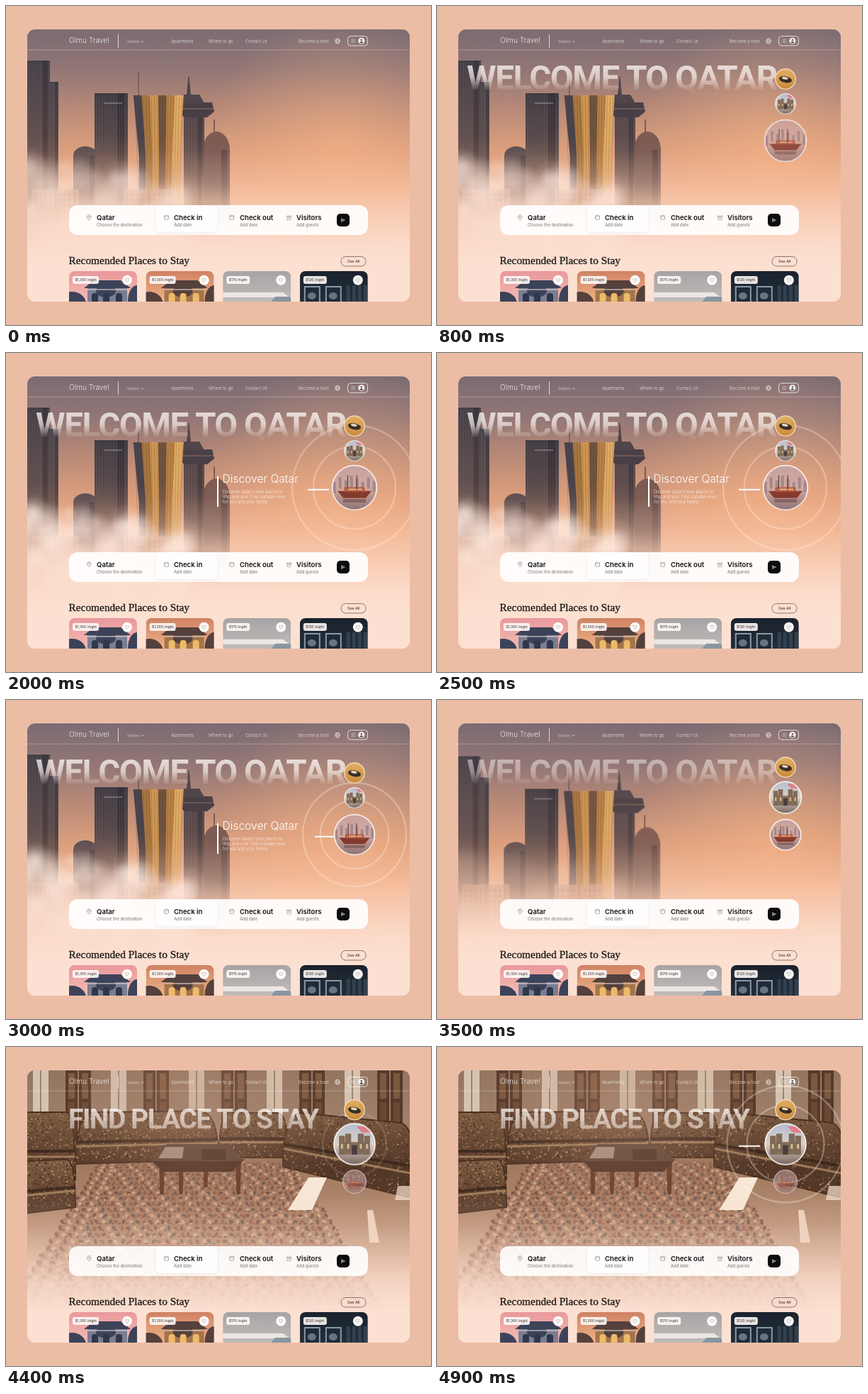
Recreate the animation shown at these times as an HTML page with a canvas. Size 600 by 450 pixels, loop 5 s.

```html
<!DOCTYPE html>
<html lang="en">
<head>
<meta charset="utf-8">
<title>Travel landing page</title>
<style>
html, body { margin: 0; width: 100%; height: 100%; overflow: hidden; background: #ecbda5; }
canvas { display: block; width: 600px; height: 450px; }
</style>
</head>
<body>
<canvas id="stage" width="600" height="450"></canvas>
<script>
const W = 600, H = 450, LOOP = 5000, STEP = 100, TAU = Math.PI * 2;
const SANS = 'Inter, sans-serif';
const stage = document.getElementById('stage').getContext('2d');

const ramp = (t, a, b) => Math.min(1, Math.max(0, (t - a) / (b - a)));
const ease = (t, a, b) => { const u = ramp(t, a, b); return u * u * (3 - 2 * u); };
const mix = (a, b, u) => a + (b - a) * u;

let seed = 7;
const rnd = () => (seed = (seed * 16807) % 2147483647) / 2147483647;
const pick = list => list[Math.floor(rnd() * list.length)];

function layer(paint) {
  const c = document.createElement('canvas');
  c.width = W; c.height = H;
  paint(c.getContext('2d'));
  return c;
}
// Vertical gradient with evenly spaced colours
function fade(g, y0, y1, ...colors) {
  const f = g.createLinearGradient(0, y0, 0, y1);
  colors.forEach((c, i) => f.addColorStop(i / (colors.length - 1), c));
  return f;
}
function rect(g, fill, x, y, w, h) { g.fillStyle = fill; g.fillRect(x, y, w, h); }
function box(g, x, y, w, h, r) { g.beginPath(); g.roundRect(x, y, w, h, r); }
function dot(g, fill, x, y, rx, ry = rx, a = 0) {
  g.fillStyle = fill; g.beginPath(); g.ellipse(x, y, rx, ry, a, 0, TAU); g.fill();
}
function ring(g, color, width, x, y, r) {
  g.strokeStyle = color; g.lineWidth = width;
  g.beginPath(); g.arc(x, y, r, 0, TAU); g.stroke();
}
function line(g, color, width, x0, y0, x1, y1) {
  g.strokeStyle = color; g.lineWidth = width;
  g.beginPath(); g.moveTo(x0, y0); g.lineTo(x1, y1); g.stroke();
}
// Trapezoid around a centre; lean moves its lower edge sideways
function trap(g, fill, cx, y0, w0, y1, w1, lean = 0) {
  g.fillStyle = fill; g.beginPath();
  g.moveTo(cx - w0 / 2, y0); g.lineTo(cx + w0 / 2, y0);
  g.lineTo(cx + lean + w1 / 2, y1); g.lineTo(cx + lean - w1 / 2, y1);
  g.fill();
}
function text(g, str, x, y, size, fill, weight = 400, family = SANS) {
  g.font = `${weight} ${size}px ${family}`; g.fillStyle = fill; g.fillText(str, x, y);
}

// ---- Skyline ----
const sky = layer(g => {
  rect(g, fade(g, 33, 375, '#7b6b73', '#927675', '#b98a77', '#dda07e', '#efb38f', '#f5c6aa', '#fce1d2'), 0, 0, W, H);
  const glow = g.createRadialGradient(470, 200, 10, 470, 200, 190);
  glow.addColorStop(0, 'rgba(255,186,138,.45)');
  glow.addColorStop(1, 'rgba(255,186,138,0)');
  rect(g, glow, 0, 0, W, H);
});

function tower(g, x, w, top, color, dome = 0) {
  const fill = fade(g, top, 330, color, '#64514f', '#ad8674');
  if (dome) dot(g, fill, x + w / 2, top + dome, w / 2, dome);
  rect(g, fill, x, top + dome, w, 330 - top);
  for (let i = 3; i < w; i += 4)
    line(g, 'rgba(165,135,128,.28)', .7, x + i, top + dome + 3, x + i, 320);
  rect(g, 'rgba(28,25,33,.3)', x + w * .68, top + dome, w * .22, 200);
}

const towers = layer(g => {
  tower(g, 278, 38, 177, '#805b52', 26);
  line(g, '#805b52', 2, 294, 160, 294, 182);
  tower(g, 30, 32, 77, '#443f48');
  tower(g, 60, 14, 107, '#4a444b');
  tower(g, 95, 34, 198, '#554a51', 13);
  tower(g, 125, 47, 123, '#3f3b43');
  rect(g, 'rgba(170,150,148,.5)', 138, 136, 26, 2);
  tower(g, 251, 29, 140, '#53454a');
  trap(g, '#493f46', 268, 136, 46, 149, 52);
  trap(g, '#493f46', 268, 149, 52, 157, 32);
  trap(g, '#50454b', 262, 125, 22, 137, 36);
  trap(g, '#50454b', 258, 99, 1, 126, 6);
  line(g, '#a87c68', .8, 244, 145, 293, 145);

  // Faceted gold tower, pinched in the middle
  for (let i = 0; i < 6; i++) {
    const tone = ['#4b444c', '#a87640', '#d09650', '#71543f', '#b98145', '#e0ab63'][i];
    const waist = 193 + i * 9.4;
    trap(g, tone, 186 + i * 11.7, 126, 12.5, 212, 10.5, waist - 186 - i * 11.7);
    trap(g, tone, waist, 211.5, 10.5, 330, 12);
    for (let k = 0; k < 3; k++)
      line(g, 'rgba(55,40,36,.3)', .7, 182 + i * 11.7 + k * 4, 128, waist - 4 + k * 4, 320);
  }
  line(g, '#54474c', 1, 187, 127, 187, 93);

  for (const x of [36, 70, 166, 204]) {
    rect(g, 'rgba(186,145,126,.75)', x, 258, 33, 80);
    for (let i = 0; i < 32; i++)
      rect(g, 'rgba(100,72,68,.4)', x + 4 + i % 4 * 7, 264 + (i >> 2) * 8, 3, 4);
  }
  g.globalCompositeOperation = 'destination-out';
  rect(g, fade(g, 185, 335, 'rgba(0,0,0,0)', 'rgba(0,0,0,.35)', '#000'), 0, 0, W, H);
});

const clouds = layer(g => {
  for (let i = 0; i < 150; i++) {
    const x = 10 + rnd() * 250, r = 12 + rnd() * 22;
    const y = 222 + Math.max(0, x - 70) * .2 + rnd() * 100;
    const f = g.createRadialGradient(x, y, 0, x, y, r);
    f.addColorStop(0, 'rgba(255,244,238,.3)');
    f.addColorStop(.5, 'rgba(255,239,231,.17)');
    f.addColorStop(1, 'rgba(255,236,226,0)');
    dot(g, f, x, y, r);
  }
});

// ---- Living room ----
const FLORAL = ['#3b281c', '#a68059', '#4b3224', '#c29b70', '#8b5c3e'];
const RUG = ['#7d5343', '#c8a184', '#6b5a55', '#955f4a'];

function sofa(g, x, y, w, h, slant = 0) {
  g.save();
  g.beginPath();
  g.moveTo(x, y + h);
  g.quadraticCurveTo(x, y, x + w * .14, y);
  g.lineTo(x + w * .86, y + slant * .3);
  g.quadraticCurveTo(x + w, y + slant * .3, x + w, y + h + slant);
  g.closePath();
  g.fillStyle = fade(g, y, y + h, '#7b5b42', '#664733', '#543828');
  g.fill();
  g.strokeStyle = '#4a2e1e'; g.lineWidth = 2; g.stroke();
  g.clip();
  g.globalAlpha = .75;
  for (let i = 0; i < w * h / 16; i++)
    dot(g, pick(FLORAL), x + rnd() * w, y + rnd() * (h + slant), .7 + rnd(), .6 + rnd() * .6, rnd() * 3);
  line(g, '#35231a', 4, x, y + h * .58, x + w, y + h * .58 + slant * .7);
  line(g, '#b58f68', 3, x, y + h * .66, x + w, y + h * .66 + slant * .8);
  g.restore();
}

const room = layer(g => {
  rect(g, fade(g, 33, 165, '#93745f', '#a78a75'), 0, 0, W, H);
  for (let x = -26; x < W; x += 110) {
    for (const side of [0, 19]) {
      rect(g, '#56392a', x + side, 33, 17, 100);
      rect(g, '#7c583f', x + side + 4, 37, 9, 36);
      rect(g, '#6a4833', x + side + 4, 78, 9, 50);
    }
    rect(g, '#d5c3b0', x + 64, 33, 22, 78);
    line(g, '#896c58', 1.5, x + 75, 33, x + 75, 110);
  }

  rect(g, fade(g, 150, 400, '#9b7358', '#bd957b', '#e0b89f'), 0, 150, W, 300);
  // Woven rug: rosettes on a grid in perspective, with a border
  for (let row = 0; row < 26; row++) {
    const v = (row / 25) ** 1.4, y = mix(164, 370, v), half = mix(138, 265, v), gap = mix(7, 13, v);
    rect(g, 'rgba(158,116,91,.6)', 268 - half, y - gap / 2, half * 2, gap);
    for (let x = -half, col = 0; x < half; x += gap, col++) {
      const edge = Math.abs(x) > half * .84;
      dot(g, edge ? RUG[col % 2] : RUG[(col + row * 3) % 4], 268 + x + rnd() * 4, y, gap * .36, gap * .24, rnd() * 3);
      dot(g, pick(RUG), 271 + x + rnd() * 5, y + gap * .3, gap * .2, gap * .14);
    }
  }

  sofa(g, 98, 92, 202, 73, -6);
  sofa(g, 301, 93, 97, 63);
  sofa(g, 391, 93, 190, 76, 46);
  sofa(g, 0, 92, 98, 95);
  sofa(g, 0, 162, 98, 76, -12);

  for (const x of [220, 247, 282, 328]) trap(g, '#613822', x, 160, 8, x % 3 ? 208 : 198, 5);
  trap(g, '#4d2f20', 270, 158, 134, 176, 98);
  trap(g, '#5c4437', 270, 137, 86, 161, 132);
  trap(g, 'rgba(218,198,182,.6)', 238, 141, 26, 157, 34, -6);
  box(g, 276, 144, 34, 15, 2); g.fillStyle = '#4a3024'; g.fill();

  trap(g, '#f8e7d6', 440, 184, 26, 230, 34, -25);
  trap(g, 'rgba(250,228,208,.8)', 514, 230, 8, 276, 14, 6);
  trap(g, 'rgba(250,228,208,.7)', 562, 196, 18, 216, 26);
  const haze = g.createRadialGradient(265, 85, 20, 265, 85, 200);
  haze.addColorStop(0, 'rgba(190,145,120,.35)');
  haze.addColorStop(1, 'rgba(190,145,120,0)');
  rect(g, haze, 0, 0, W, H);
});

const mist = layer(g => rect(g, fade(g, 205, 375, 'rgba(250,210,190,0)', 'rgba(250,212,193,.18)',
  'rgba(250,215,197,.5)', 'rgba(251,220,204,.85)', '#fce1d2'), 0, 0, W, H));

// ---- Thumbnails, drawn on a unit circle ----
const scenes = [
  g => {
    rect(g, fade(g, -1, 1, '#e2b063', '#c98a3b'), -1, -1, 2, 2);
    dot(g, '#382e28', 0, .05, .62, .3, .2);
    dot(g, '#e5d5bd', -.05, -.08, .3, .12, .2);
  },
  g => {
    rect(g, fade(g, -1, 1, '#b3bfce', '#dccfc7', '#75655c'), -1, -1, 2, 2);
    trap(g, '#df7f8b', .35, -.85, .5, -.55, .5, .25);
    rect(g, '#86705d', -.7, -.1, 1.4, .6);
    for (const x of [-.6, -.3, .3, .6]) {
      rect(g, '#806a58', x - .14, -.4 - .1 * (Math.abs(x) < .5), .28, .9);
      rect(g, '#d8bd8f', x - .05, 0, .1, .22);
    }
    rect(g, '#4a3f3c', -.13, .05, .26, .45);
  },
  g => {
    rect(g, fade(g, -1, 1, '#c6a1a0', '#d4aaa0', '#8b7274'), -1, -1, 2, 2);
    for (let i = 0; i < 8; i++) rect(g, '#a3888d', -.95 + i * .25, -.25 - (i * 3 % 5) * .07, .13, .5);
    trap(g, '#843a2d', 0, .15, 1.5, .45, 1);
    rect(g, '#b8583d', -.45, -.02, .9, .2);
    rect(g, '#dfb08c', -.35, .04, .7, .07);
    for (const x of [-.3, .1]) line(g, '#6d3d34', .04, x, .1, x, -.55);
    rect(g, 'rgba(95,55,50,.45)', -.5, .5, 1, .15);
  }
];
function thumb(g, i, y, r, alpha) {
  if (alpha <= 0 || r < 1) return;
  g.save();
  g.globalAlpha = alpha;
  g.translate(492, y);
  g.save();
  g.scale(r, r);
  g.beginPath(); g.arc(0, 0, 1, 0, TAU); g.clip();
  scenes[i](g);
  g.restore();
  ring(g, 'rgba(255,246,240,.85)', r > 22 ? 1.8 : 1.1, 0, 0, r - .6);
  g.restore();
}

// ---- Fixed interface ----
const ICON = '#8a8381';

function calendar(g, x) {
  g.strokeStyle = ICON; g.lineWidth = .7;
  box(g, x - 3, 295.4, 6, 5.8, 1.2); g.stroke();
  line(g, ICON, .6, x - 3, 297.2, x + 3, 297.2);
}
function field(g, x, title, note) {
  text(g, title, x, 302, 9.6, '#141313', 600);
  text(g, note, x, 311, 5.85, '#8b8684', 500);
}
function house(g, wall, roof, light) {
  rect(g, wall, 26, 22, 56, 30);
  trap(g, roof, 54, 13, 38, 24, 66);
  dot(g, roof, 52, 28, 14, 9);
  for (const x of [32, 48, 66]) { box(g, x, 31, 9, 20, 4); g.fillStyle = light; g.fill(); }
  dot(g, roof, 4, 46, 20, 17);
  dot(g, roof, 96, 42, 13, 22);
  line(g, 'rgba(240,225,220,.7)', 1.5, 26, 26, 82, 26);
}
const photos = [
  g => {
    rect(g, fade(g, 0, 44, '#e9989b', '#f3bdb3'), 0, 0, 96, 44);
    house(g, '#7b7d92', '#3c4359', '#2f374b');
  },
  g => {
    rect(g, fade(g, 0, 44, '#cf8264', '#f0b488'), 0, 0, 96, 44);
    house(g, '#a3744c', '#54413d', '#edbb68');
  },
  g => {
    rect(g, fade(g, 0, 44, '#a7a3a4', '#c2bcba'), 0, 0, 96, 44);
    trap(g, '#ece7e3', 40, 30, 90, 37, 108);
    trap(g, '#8896a2', 84, 36, 20, 44, 34);
  },
  g => {
    rect(g, fade(g, 0, 44, '#1a222d', '#222e3a'), 0, 0, 96, 44);
    for (const x of [6, 36]) {
      rect(g, '#8d9aa6', x, 21, 23, 25);
      rect(g, '#202b37', x + 2, 23, 19, 22);
      dot(g, '#667583', x + 11, 35, 6, 5);
    }
    for (let x = 66; x < 96; x += 8) rect(g, '#33414f', x, 20, 5, 24);
  }
];

function placeCard(g, i) {
  const price = i < 2 ? '$1,300' : i < 3 ? '$170' : '$120';
  g.save();
  g.translate(89 + i * 108.6, 374);
  box(g, 0, 0, 96, 60, 8); g.clip();
  photos[i](g);
  g.fillStyle = 'rgba(255,250,248,.9)';
  box(g, 5, 7, i < 2 ? 37 : 33, 11, 3); g.fill();
  text(g, price + ' /night', 8.5, 14.3, 4.8, '#4c4442', 500);
  dot(g, 'rgba(255,252,251,.97)', 82, 12.7, 7);
  g.strokeStyle = '#9c9593'; g.lineWidth = .6;
  g.beginPath(); g.moveTo(82, 15);
  g.bezierCurveTo(77, 11.5, 80.4, 9, 82, 11.4);
  g.bezierCurveTo(83.6, 9, 87, 11.5, 82, 15);
  g.stroke();
  g.restore();
}

const ui = layer(g => {
  const white = 'rgba(255,255,255,.82)';
  line(g, 'rgba(255,255,255,.28)', 1, 30, 62, 570, 62);
  text(g, 'Olmu Travel', 89, 52.3, 10.2, white, 300);
  line(g, 'rgba(255,255,255,.7)', 1, 158.5, 40, 158.5, 59);
  text(g, 'Visitors', 171, 51.7, 5, white, 300);
  line(g, white, .7, 191, 49.2, 192.7, 51);
  line(g, white, .7, 192.7, 51, 194.4, 49.2);
  text(g, 'Apartments', 233, 51.8, 5.9, white, 300);
  text(g, 'Where to go', 286, 51.8, 6.1, white, 300);
  text(g, 'Contact Us', 338, 51.8, 6, white, 300);
  text(g, 'Become a host', 413, 51.8, 6.1, white, 300);
  ring(g, white, .7, 468, 49.5, 3.4);
  g.beginPath(); g.ellipse(468, 49.5, 1.5, 3.4, 0, 0, TAU); g.stroke();
  line(g, white, .6, 464.6, 49.5, 471.4, 49.5);
  g.lineWidth = .9;
  box(g, 482.5, 42.5, 28, 13.5, 4); g.stroke();
  for (const y of [47.2, 49.2, 51.2]) line(g, 'rgba(255,255,255,.6)', .7, 487.5, y, 493, y);
  dot(g, '#fff', 501.8, 49.2, 4.4);
  dot(g, '#675b60', 501.8, 48, 1.4);
  dot(g, '#675b60', 501.8, 51.4, 2.4, 1.3);

  g.fillStyle = 'rgba(255,255,255,.91)';
  box(g, 89, 281, 422, 42, 12); g.fill();
  g.save();
  g.shadowColor = 'rgba(120,80,60,.1)'; g.shadowBlur = 5; g.shadowOffsetY = 1.5;
  g.fillStyle = 'rgba(255,255,255,.95)';
  box(g, 212, 281, 86, 38, 5); g.fill();
  g.restore();
  field(g, 128, 'Qatar', 'Choose the destination');
  field(g, 237, 'Check in', 'Add date');
  field(g, 330, 'Check out', 'Add date');
  field(g, 410, 'Visitors', 'Add guests');
  g.strokeStyle = ICON; g.lineWidth = .7;
  g.beginPath(); g.arc(117.2, 297.5, 2.8, Math.PI * .85, Math.PI * .15); g.lineTo(117.2, 302); g.closePath(); g.stroke();
  ring(g, ICON, .6, 117.2, 297.4, 1);
  calendar(g, 226.5); calendar(g, 318.7);
  for (const x of [397, 399.5, 402]) ring(g, ICON, .6, x, 297, 1.1);
  g.beginPath(); g.ellipse(399.5, 300.6, 3.4, 1.4, 0, 0, TAU); g.stroke();
  g.fillStyle = '#0d0c0d';
  box(g, 467, 293, 18, 18, 5); g.fill();
  g.fillStyle = '#858181';
  g.beginPath(); g.moveTo(473, 299); g.lineTo(479.5, 302.1); g.lineTo(473, 305.2); g.fill();

  const heading = 'Recomended Places to Stay';
  text(g, heading, 88.5, 363.6, 15.4, '#1d1816', 400, '"Liberation Serif", serif');
  g.strokeStyle = '#1d1816'; g.lineWidth = .3;
  g.strokeText(heading, 88.5, 363.6);
  g.strokeStyle = '#5d4d47'; g.lineWidth = .7;
  box(g, 473, 353.5, 35, 13.5, 6.5); g.stroke();
  text(g, 'See All', 482, 362.1, 5.4, '#2b2422');
  for (let i = 0; i < 4; i++) placeCard(g, i);
});

// ---- Animated parts ----
function title(g, str, x, y, size, alpha, end) {
  if (alpha <= 0) return;
  g.save();
  g.globalAlpha = alpha;
  g.letterSpacing = '-1.5px';
  const fill = fade(g, y - size * .72, y, 'rgba(255,250,248,.76)', 'rgba(255,248,244,.64)', `rgba(255,244,238,${end})`);
  text(g, str, x, y, size, fill, 700, 'Roboto, sans-serif');
  g.restore();
}
function pulse(g, y, k, reach, x) {
  const r = 30 + 58 * k, a = .3 * Math.min(1, k * 1.6);
  if (k > 0) for (const s of [1, .66]) ring(g, `rgba(255,240,230,${a})`, 2.4, 492, y, r * s);
  if (reach > 0) line(g, `rgba(255,255,255,${reach})`, 2, x, y + 2.7, x + 30, y + 2.7);
}
function discover(g, alpha) {
  if (alpha <= 0) return;
  g.save();
  g.globalAlpha = alpha;
  rect(g, '#fff', 298, mix(195, 174, alpha), 2, 43 * alpha);
  text(g, 'Discover Qatar', 305.5, 183, 15.6, '#fff', 300);
  ['Discover Qatar’s best places to', 'stay and visit. Find suitable ones', 'for you and your family']
    .forEach((s, i) => text(g, s, 306, 198 + i * 7, 5.9, 'rgba(255,255,255,.85)', 300));
  g.restore();
}

function draw(t) {
  const g = stage;
  g.globalAlpha = 1;
  rect(g, '#ecbda5', 0, 0, W, H);
  g.save();
  box(g, 30, 33, 540, 384, 11); g.clip();

  const enter = ease(t, 100, 700), leave = ease(t, 3300, 3900);
  g.drawImage(sky, 0, 0);
  g.globalAlpha = 1 - .3 * leave;
  g.drawImage(towers, -3 * leave, 9 * leave);
  g.globalAlpha = mix(.7, 1, ease(t, 0, 1600)) * (1 - ease(t, 2900, 3700));
  g.drawImage(clouds, -6 + t * .003, 0);
  g.globalAlpha = 1;
  title(g, 'WELCOME TO QATAR', 42, 118 + 18 * (1 - enter), 47.6, enter * (1 - ramp(t, 3250, 3900)), .08);

  // The next scene opens as a circle around the middle thumbnail
  const open = ramp(t, 3500, 4250);
  if (open > 0) {
    g.save();
    g.beginPath(); g.arc(492, 137, 545 * open, 0, TAU); g.clip();
    g.globalAlpha = ramp(t, 3500, 4000);
    g.drawImage(room, 0, 0);
    title(g, 'FIND PLACE TO STAY', 88, 114.5, 39.1, g.globalAlpha, .5);
    g.restore();
  }
  g.drawImage(mist, 0, 0);

  const k = ease(t, 1000, 1700) * (1 - ease(t, 2750, 3500));
  pulse(g, 190, k, Math.min(1, k * 1.3), 426 + 38 * (1 - k));
  discover(g, ease(t, 1100, 1700) * (1 - ease(t, 3100, 3500)));
  const reach = ease(t, 4450, 4800);
  pulse(g, 137, ease(t, 4050, 5100), reach, 446 - 20 * reach);

  const swap = ease(t, 3150, 3800);
  const big = 30 * ease(t, 250, 750) + 2 * ease(t, 1000, 1700) - 3 * ease(t, 2500, 3000);
  const faint = 1 - .45 * ease(t, 3900, 4400);
  thumb(g, 0, mix(103, 88.5, swap), 14.8 * enter, enter);
  thumb(g, 2, 190, mix(big, 17, swap), mix(.8, 1, ease(t, 800, 1500)) * ease(t, 250, 750) * faint);
  thumb(g, 1, mix(138, 137, swap), mix(14.8, 29.5, swap) * enter, enter);

  g.drawImage(ui, 0, 0);
  g.restore();
}

const start = performance.now();
function frame() {
  const t = (performance.now() - start) % LOOP;
  draw(Math.floor(t / STEP) * STEP);
  requestAnimationFrame(frame);
}
frame();
</script>
</body>
</html>
```
